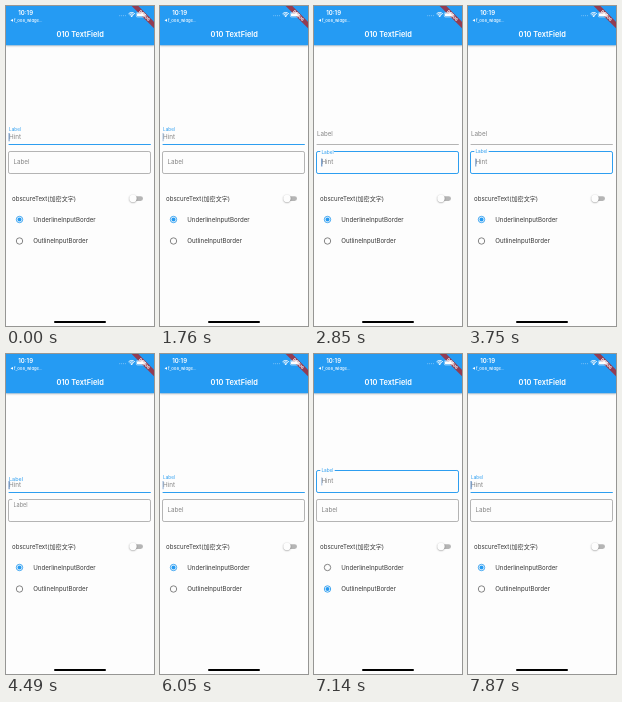
An HTML page with a canvas that plays this animation: 148x320 px, repeating every 8 s.

```html
<!DOCTYPE html>
<html lang="en">
<head>
<meta charset="utf-8">
<title>010 TextField</title>
<style>
html, body { margin: 0; width: 100%; height: 100%; overflow: hidden; background: #fdfdfd; }
canvas { display: block; width: 148px; height: 320px; }
</style>
</head>
<body>
<canvas id="stage"></canvas>
<script>
const LOOP = 8000;
const BLUE = '#259bf3', GRAY = '#858585', PAPER = '#fdfdfd', INK = '#383838';
const canvas = document.getElementById('stage');
const scale = window.devicePixelRatio || 1;
canvas.width = 148 * scale;
canvas.height = 320 * scale;
const ctx = canvas.getContext('2d');

const clamp = v => Math.min(1, Math.max(0, v));
const mix = (a, b, k) => a + (b - a) * k;
const ramp = (t, from, to) => clamp((t - from) / (to - from));
const ease = (t, from, to) => { const k = ramp(t, from, to); return k * k * (3 - 2 * k); };

// Blend from a gray level to the accent blue.
const tint = (k, gray = 133) => `rgb(${mix(gray, 45, k)},${mix(gray, 158, k)},${mix(gray, 240, k)})`;

function text(str, x, y, size, color, { weight = 400, align = 'left', alpha = 1 } = {}) {
  ctx.save();
  ctx.globalAlpha = alpha;
  ctx.font = `${weight} ${size}px Inter, "Noto Sans CJK SC", "Noto Sans CJK", sans-serif`;
  ctx.textAlign = align;
  ctx.fillStyle = color;
  ctx.fillText(str, x, y);
  ctx.restore();
}

function box(x, y, w, h, color, radius = 0) {
  ctx.beginPath();
  ctx.roundRect(x, y, w, h, radius);
  ctx.fillStyle = color;
  ctx.fill();
}

function disc(x, y, r, color) {
  ctx.beginPath();
  ctx.arc(x, y, r, 0, 7);
  ctx.fillStyle = color;
  ctx.fill();
}

function shape(color, ...points) {
  ctx.beginPath();
  points.forEach(p => ctx.lineTo(...p));
  ctx.fillStyle = color;
  ctx.fill();
}

function statusBar() {
  text('10:19', 12.2, 9.4, 6, '#fff', { weight: 600 });
  shape('#fff', [4.5, 14.3], [7, 12.9], [7, 15.7]);
  text('f_008_widge…', 8, 15.8, 4.1, '#fff', { weight: 500 });
  for (let i = 0; i < 4; i++) disc(113.8 + i * 1.9, 9.7, 0.45, 'rgba(255,255,255,.7)');
  ctx.strokeStyle = '#fff';
  ctx.lineWidth = 0.9;
  for (const r of [1.7, 3.1, 4.5]) {
    ctx.beginPath();
    ctx.arc(125.7, 11, r, -Math.PI * 0.75, -Math.PI * 0.25);
    ctx.stroke();
  }
  disc(125.7, 10.4, 0.7, '#fff');
  ctx.lineWidth = 0.5;
  ctx.beginPath();
  ctx.roundRect(130.3, 6.6, 8.2, 4.4, 1.1);
  ctx.stroke();
  box(131, 7.3, 6.8, 3, '#fff', 0.6);
  box(139, 8, 0.6, 1.6, '#fff');
}

function header() {
  ctx.save();
  ctx.shadowColor = 'rgba(0,0,0,.25)';
  ctx.shadowBlur = 2 * scale;
  ctx.shadowOffsetY = 0.6 * scale;
  box(0, 0, 148, 39.2, BLUE);
  ctx.restore();
  text('010 TextField', 74.2, 31, 7.4, '#fff', { weight: 600, align: 'center' });

  ctx.save();
  ctx.translate(148, 0);
  ctx.rotate(Math.PI / 4);
  box(-16, 11.05, 32, 4.75, 'rgba(183,28,28,.75)');
  text('DEBUG', 0, 14.8, 3.9, '#fff', { weight: 800, align: 'center' });
  ctx.restore();
  statusBar();
}

function cursor(x, y, alpha) {
  ctx.globalAlpha = alpha;
  box(x, y, 1, 8.2, '#4a7cba');
  ctx.globalAlpha = 1;
}

// `float` moves the label, `tone` drives the colours and the hint.
function underlineField(float, tone, blink) {
  box(2.6, 138, 142.2, 1, tint(tone, 180));
  text('Label', 3, mix(129.9, 125, float), mix(6.3, 4.7, float), tint(tone));
  text('Hint', 3, 133.2, 6.3, GRAY, { alpha: tone });
  cursor(2.6, 127, blink);
}

function outlineField(top, float, tone, blink) {
  ctx.beginPath();
  ctx.roundRect(2.5, top, 142, 22, 1.6);
  ctx.strokeStyle = tint(tone, 180);
  ctx.lineWidth = 1;
  ctx.stroke();
  if (float > 0) box(6.3, top - 1, 14.4 * float, 2, PAPER);
  text('Label', 7.4, mix(top + 12.4, top + 1.4, float), mix(6.3, 4.7, float), tint(tone));
  text('Hint', 7.4, top + 12.7, 6.3, GRAY, { alpha: tone });
  cursor(7.3, top + 6.9, blink);
}

function radio(y, label, on) {
  ctx.beginPath();
  ctx.arc(13.5, y, 3.2, 0, 7);
  ctx.strokeStyle = tint(on, 120);
  ctx.lineWidth = 0.9;
  ctx.stroke();
  if (on > 0) disc(13.5, y, 2 * on, BLUE);
  text(label, 27.2, y + 2.1, 6.15, INK);
}

function ripple(t, start, y) {
  const fade = ramp(t, start, start + 60) * (1 - ramp(t, start + 120, start + 340));
  if (!fade) return;
  ctx.save();
  ctx.beginPath();
  ctx.rect(0, y - 10.8, 148, 21.6);
  ctx.clip();
  disc(13.5, y, mix(4, 14, ease(t, start, start + 300)), `rgba(0,0,0,${0.06 * fade})`);
  ctx.restore();
}

// Alternating fade-out and fade-in start times.
const BLINKS = [[620, 990], [1710, 2100], [3240, 3630], [4900, 5280], [6010, 6390], [7090, 7450]];

function blinkAt(t) {
  let alpha = t < 2640 ? mix(0.85, 1, ramp(t, 0, 70)) : 1;
  for (const [off, on] of BLINKS)
    alpha = Math.min(alpha, 1 - ramp(t, off, off + 110) + ramp(t, on, on + 150));
  return alpha;
}

function draw(t) {
  ctx.setTransform(scale, 0, 0, scale, 0, 0);
  box(0, 0, 148, 320, PAPER);
  header();

  const focusSecond = duration => ease(t, 2620, 2620 + duration) - ease(t, 4350, 4350 + duration);
  const float = focusSecond(270), tone = focusSecond(140);
  const inSecond = t >= 2660 && t < 4400;
  const blink = blinkAt(t);
  const firstBlink = inSecond ? 0 : blink;
  if (t >= 6230 && t < 7680) outlineField(116.5, 1, 1, firstBlink);
  else underlineField(1 - float, 1 - tone, firstBlink);
  outlineField(145.5, float, tone, inSecond ? blink : 0);

  text('obscureText(加密文字)', 6, 194.5, 6.1, INK);
  box(124, 190.2, 13, 4.8, '#b5b5b5', 2.4);
  ctx.save();
  ctx.shadowColor = 'rgba(0,0,0,.4)';
  ctx.shadowBlur = 1.6 * scale;
  ctx.shadowOffsetY = 0.5 * scale;
  disc(127, 192.5, 3.7, PAPER);
  ctx.restore();

  const outlined = ease(t, 6190, 6400) - ease(t, 7640, 7860);
  ripple(t, 6150, 235);
  radio(213.5, 'UnderlineInputBorder', 1 - outlined);
  radio(235, 'OutlineInputBorder', outlined);
  box(48, 315.1, 52, 1.9, '#000', 1);
}

const start = performance.now();
function tick() {
  draw((performance.now() - start) % LOOP);
  requestAnimationFrame(tick);
}
tick();
</script>
</body>
</html>
```
